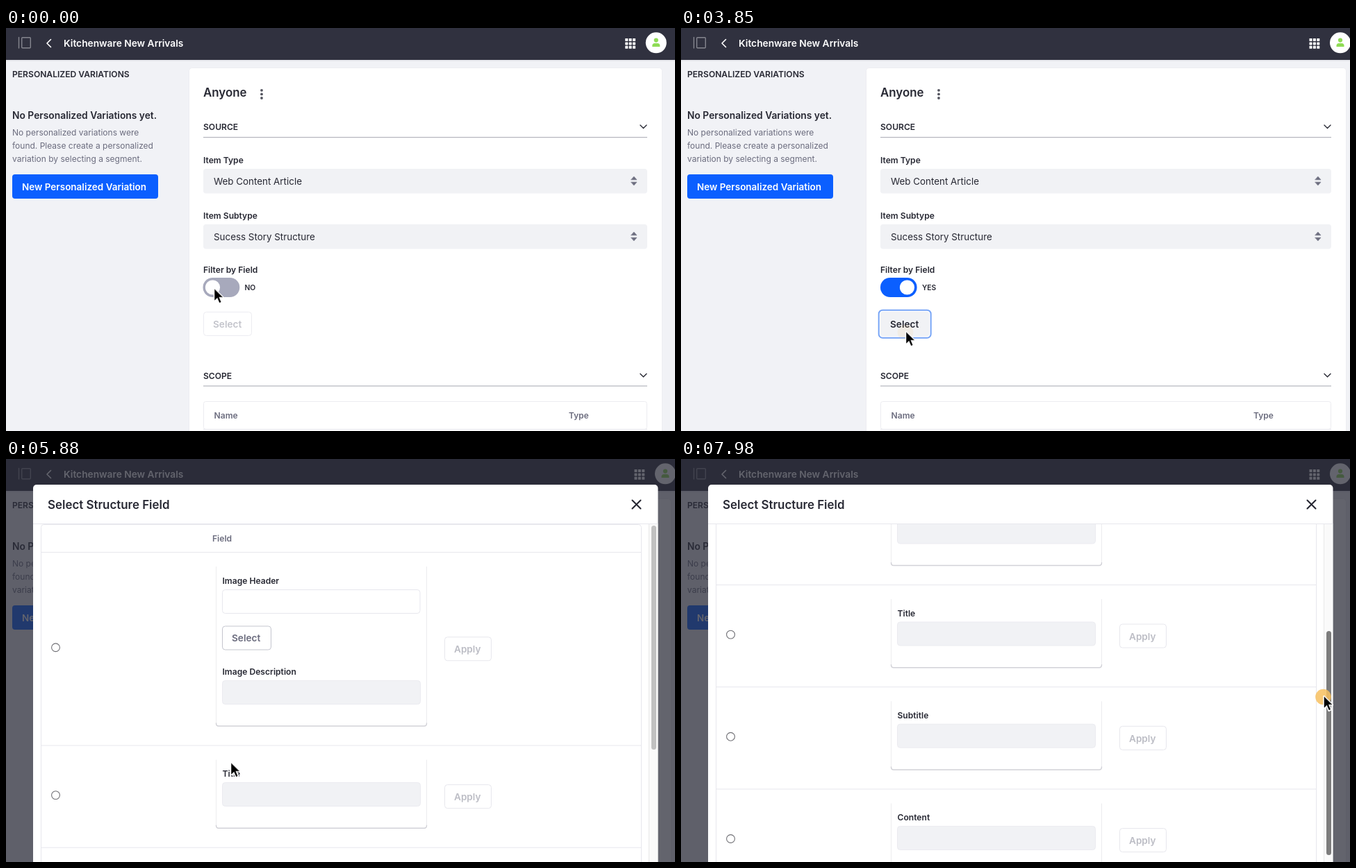
Write an HTML page that moves like this. It is 963 px wide and 581 px high and loops after 8000 ms.

```html
<!DOCTYPE html>
<html lang="en">
<head>
<meta charset="utf-8">
<title>Personalized variations</title>
<style>
  html, body { margin: 0; width: 100%; height: 100%; overflow: hidden; background: #f1f2f6; }
  svg { display: block; width: 100vw; height: 100vh; font-family: Inter, "Open Sans", sans-serif; }
</style>
</head>
<body>
<svg id="stage" viewBox="0 0 963 581" preserveAspectRatio="none"></svg>
<script>
const INK = '#272833', GREY = '#6b6c7e', BLUE = '#0b5fff', FIELD = '#f1f2f5', LINE = '#e7e7ed', RING = '#78a5f6';

// ---- drawing helpers; text is placed by the middle of its capitals ----
const text = (x, mid, s, size = 12.1, fill = INK, weight = 600) =>
  `<text x="${x}" y="${mid + size * .364}" font-size="${size}" font-weight="${weight}" fill="${fill}">${s}</text>`;
const rect = (x, y, w, h, fill, r = 0, stroke = 'none', sw = 1) =>
  `<rect x="${x}" y="${y}" width="${w}" height="${h}" rx="${r}" fill="${fill}" stroke="${stroke}" stroke-width="${sw}"/>`;
const circle = (x, y, r, fill, stroke = 'none', sw = 1) =>
  `<circle cx="${x}" cy="${y}" r="${r}" fill="${fill}" stroke="${stroke}" stroke-width="${sw}"/>`;
const path = (d, stroke, sw = 1.5, fill = 'none') =>
  `<path d="${d}" fill="${fill}" stroke="${stroke}" stroke-width="${sw}" stroke-linecap="round" stroke-linejoin="round"/>`;
const group = (id, body, attrs = '') => `<g id="${id}" ${attrs}>${body}</g>`;
const button = (x, y, w, label, fill, border) =>
  rect(x + .5, y + .5, w - 1, 34, '#fff', 4, border) + text(x + 14, y + 18, label, 13.6, fill);

function sidebar() {
  const lines = ['No personalized variations were', 'found. Please create a personalized', 'variation by selecting a segment.'];
  return text(9, 66.5, 'PERSONALIZED VARIATIONS') +
    text(9, 125.5, 'No Personalized Variations yet.', 13.8) +
    lines.map((s, i) => text(9, 151 + i * 18.6, s, 12, GREY, 400)).join('') +
    rect(9, 211, 210, 35, BLUE, 4) +
    text(23, 229, 'New Personalized Variation', 13.5, '#fff');
}

function topBar() {
  return rect(0, 46, 963, 2, '#e6e7ec') + rect(0, 0, 963, 46, '#30313f') +
    path('M18.5 13.5V29', '#85868f', 1.4) + rect(22.7, 13.7, 12.6, 15, 'none', 1, '#85868f', 1.4) +
    path('M64.5 16.5L59 22L64.5 27.5', '#fff', 1.6) +
    text(83, 21.5, 'Kitchenware New Arrivals', 13.75, '#fff');
}

function userArea(x) {
  let s = '';
  for (let i = 0; i < 9; i++)
    s += rect(x - 44.5 + i % 3 * 5.4, 15 + Math.floor(i / 3) * 5.4, 4, 4, '#fff', .6);
  return s + circle(x, 21.3, 15, '#fff') + circle(x, 17.6, 3.1, '#8fdc55') +
    path(`M${x - 5.5} 27V25.5Q${x - 5.5} 22 ${x - 2} 22H${x + 2}Q${x + 5.5} 22 ${x + 5.5} 25.5V27Z`, 'none', 0, '#8fdc55');
}

function section(l, r, y, label) {
  return text(l, y, label) + rect(l, y + 14, r - l, 1.2, '#b4b5bd') +
    path(`M${r - 10} ${y - 3}L${r - 5.5} ${y + 1.5}L${r - 1} ${y - 3}`, INK, 1.4);
}

function dropdown(l, r, y, label, value) {
  const x = r - 19;
  return text(l, y, label) + rect(l, y + 12.5, r - l, 35.5, FIELD, 4) +
    text(l + 15, y + 30.5, value, 13.4, INK, 400) +
    path(`M${x - 4} ${y + 28.3}H${x + 4}L${x} ${y + 23.8}ZM${x - 4} ${y + 31.7}H${x + 4}L${x} ${y + 36.2}Z`, GREY, .6, GREY);
}

// The page body; it grows when the page scrollbar goes away.
function panel(l, r, typeX, controls) {
  const dot = y => circle(l + 84, y, 1.9, '#54555f');
  return rect(l - 20.5, 57.5, r - l + 42, 560, '#fff', 4, '#ededf2') +
    text(l, 93, 'Anyone', 16.9) + dot(89.8) + dot(95.4) + dot(101) +
    section(l, r, 143, 'SOURCE') +
    dropdown(l, r, 190.5, 'Item Type', 'Web Content Article') +
    dropdown(l, r, 270.5, 'Item Subtype', 'Sucess Story Structure') +
    text(l, 349, 'Filter by Field') + controls +
    section(l, r, 501.5, 'SCOPE') +
    rect(l + .5, 538.5, r - l - 1, 40, 'none', 3, '#ececf0') + rect(l, 578, r - l, 1, LINE) +
    text(l + 15.5, 559, 'Name', 12.1, GREY) + text(typeX, 559, 'Type', 12, GREY);
}

function narrowControls() {
  return rect(281.5, 357.7, 57, 32.4, '#fff', 16.2, RING, 2).replace('<rect', '<rect id="ring"') +
    rect(283.5, 360, 52.8, 28, '#a7a9bc', 14).replace('<rect', '<rect id="track"') +
    circle(297.5, 374, 10.6, '#fff').replace('<circle', '<circle id="knob"') +
    group('no', text(343.5, 374, 'NO', 10.3) + button(284, 409, 70, 'Select', '#c3c4cb', '#ececf1')) +
    group('yes', text(343.5, 374, 'YES', 10.3) + button(284, 409, 70, 'Select', '#393a4a', '#cdced9'));
}

function wideControls() {
  return rect(287, 360, 52.6, 28, BLUE, 14) + circle(325.5, 374, 10.6, '#fff') +
    text(347, 374, 'YES', 10.3) +
    rect(284.7, 406.7, 75, 40, '#fff', 5.5, RING, 2) + rect(287, 409, 70.5, 35.5, FIELD, 4) +
    text(301, 427, 'Select', 13.6);
}

// ---- dialog ----
const grayBox = y => rect(311.5, y + .5, 285, 34, FIELD, 4, '#ebebf0');
function row(top, height, label, extra = '') {
  const bottom = top + height - 28, mid = top + height / 2 - 2;
  return rect(51, top + height - .5, 864, 1, LINE) +
    path(`M302.5 ${top + 21}V${bottom - 4}M605.5 ${top + 21}V${bottom - 4}`, '#ececef', 1) +
    path(`M302.5 ${bottom - 4}Q302.5 ${bottom} 306 ${bottom}H602Q605.5 ${bottom} 605.5 ${bottom - 4}`, '#d2d2d8', 1.5) +
    text(311.5, top + 41, label) + extra +
    circle(71.5, mid, 5.9, '#fff', '#6f6f74', 1.1) +
    button(631, mid - 15.5, 68, 'Apply', '#bcbdc5', LINE);
}

function dialog() {
  const first = rect(311.5, 188.5, 284.5, 34, '#fff', 4, LINE) +
    button(311, 240.5, 71, 'Select', GREY, '#c4c5ce') +
    text(311.5, 307, 'Image Description') + grayBox(319);
  const rows = rect(50.5, 94.5, 864, 760, '#fff', 4, LINE) + text(297, 115, 'Field', 12.1, GREY) +
    rect(51, 134, 864, 1, LINE) + row(134.5, 278.5, 'Image Header', first) +
    ['Title', 'Subtitle', 'Content'].map((s, i) => {
      const y = 413 + i * 147.2;
      return row(y, 147.2, s, grayBox(y + 53));
    }).join('');
  return rect(39, 37, 899.5, 556, '#fff', 5) +
    text(60, 65.5, 'Select Structure Field', 16.9) +
    path('M901.5 59.5L913.5 71.5M913.5 59.5L901.5 71.5', INK, 2.1) +
    rect(39, 93, 899.5, 1, LINE) +
    group('spin', '') +
    group('content', group('rows', rows) + rect(925.5, 94, 13, 499, '#fafafa') + rect(925, 94, 1, 499, '#e8e8e8') +
      rect(929, 96, 7, 323, '#c1c1c1', 3.5).replace('<rect', '<rect id="thumb"'), 'clip-path="url(#view)"');
}

const arrow = path('M0 0V17.2L4 13.5L7 20.8L10 19.5L7 12.4H12.4Z', '#fff', 2.4, '#fff') +
  path('M.5 1.2V16.2L4.3 12.6L7.4 19.8L9.2 19L6.2 11.8H11.2Z', '#000', .5, '#000');
const hand = `<g transform="rotate(-8)">` +
  path('M-2 1C-2-1 2-1 2 1V8C2 6.3 5.4 6.3 5.4 8.5C5.4 7 8.8 7.3 8.8 9.4C8.8 8.2 12 8.6 12 11V14.5C12 17 10.3 18 10.3 21H1C1 18-4 15-6 11.5C-7.4 9-4.4 7.8-3.4 9.8L-2 11.8Z', '#111', 1.5, '#fff') +
  path('M2.8 13V17.5M5.6 13V17.5M8.4 13V17.5', '#111', 1.1) + '</g>';

const stage = document.getElementById('stage');
stage.innerHTML =
  '<clipPath id="view"><rect x="39" y="94" width="899.5" height="499"/></clipPath>' +
  rect(0, 0, 963, 581, '#f1f2f6') + sidebar() +
  group('narrow', panel(284, 923, 810, narrowControls())) +
  group('wide', panel(287, 936, 824, wideControls())) +
  topBar() + group('userNarrow', userArea(935.8)) + group('userWide', userArea(949)) +
  group('shade', rect(0, 0, 963, 581, '#2a2b38')) +
  group('dialog', dialog()) +
  group('click', circle(0, 0, 11.3, '#f7bf5f')) +
  group('arrow', arrow) + group('hand', hand);

const el = {};
stage.querySelectorAll('[id]').forEach(n => el[n.id] = n);
const set = (id, name, value) => el[id].setAttribute(name, value);
const show = (id, on) => { el[id].style.display = on ? '' : 'none'; };

// ---- motion ----
const LOOP = 8000, STEP = 70;
const TOGGLE = 1190, PRESS = 3640, WIDEN = 3780, OPEN = 3890, LOADED = 4620, DRAG = 7280;
const clamp = v => Math.max(0, Math.min(1, v));
const span = (t, a, b) => clamp((t - a) / (b - a));
const ease = p => p * p * (3 - 2 * p);
const mix = (a, b, p) => a + (b - a) * p;

// time, x, y
const route = [
  [0, 300, 376], [1540, 300, 376], [2030, 311, 428], [2240, 311, 428], [2730, 324, 438],
  [5880, 324, 438], [6650, 935, 186], [7210, 935, 186], [DRAG, 934, 190], [7980, 925.5, 342]
];
function pointer(t) {
  let i = 0;
  while (i < route.length - 2 && t >= route[i + 1][0]) i++;
  const [a, x, y] = route[i], [b, u, v] = route[i + 1], p = ease(span(t, a, b));
  return [mix(x, u, p), mix(y, v, p)];
}

const sizes = [5.6, 4.7, 4, 3.5, 2.6, 2.9, 5.6], alphas = [1, .75, .55, .42, .25, .35, 1];
function spinner(t) {
  const head = (Math.min(t, 4410) - 4060) / 200;
  let s = '';
  for (let k = 0; k < 6; k++) {
    const lag = ((head - k) % 6 + 6) % 6, i = Math.floor(lag), f = lag - i, a = k * Math.PI / 3;
    s += `<g opacity="${mix(alphas[i], alphas[i + 1], f)}">` +
      circle(488.5 + 13 * Math.sin(a), 344 - 12.3 * Math.cos(a), mix(sizes[i], sizes[i + 1], f), GREY) + '</g>';
  }
  return s;
}

function render(t) {
  const wide = t >= WIDEN, on = span(t, TOGGLE, TOGGLE + 140);
  show('narrow', !wide); show('userNarrow', !wide);
  show('wide', wide); show('userWide', wide);

  set('knob', 'cx', mix(297.5, 322, on));
  set('track', 'fill', `rgb(${mix(167, 11, on)},${mix(169, 95, on)},${mix(188, 255, on)})`);
  set('ring', 'opacity', t < PRESS ? on : 0);
  show('no', on < .5); show('yes', on >= .5);

  const fade = span(t, OPEN, OPEN + 150), drop = span(t, OPEN, OPEN + 300);
  set('shade', 'opacity', fade * .73);
  set('dialog', 'opacity', fade);
  set('dialog', 'transform', `translate(0 ${-50 * Math.pow(1 - drop, 1.5)})`);
  show('dialog', fade > 0);
  const loaded = t >= LOADED;
  show('content', loaded); show('spin', !loaded);
  if (fade > 0 && !loaded) el.spin.innerHTML = spinner(t);

  const [x, y] = pointer(t);
  const pull = t > DRAG ? y - 190 : 0;
  set('thumb', 'y', 96 + pull);
  set('thumb', 'fill', t >= 6650 ? '#7d7d7d' : '#c1c1c1');
  set('rows', 'transform', `translate(0 ${-pull * 231.5 / 152})`);

  const isHand = t >= 1960 && t < 3710;
  show('hand', isHand); show('arrow', !isHand);
  set(isHand ? 'hand' : 'arrow', 'transform', `translate(${x} ${y})`);

  const pulse = a => t < a ? 0 : 1 - span(t, a + 70, a + 230);
  set('click', 'opacity', .85 * Math.max(pulse(TOGGLE - 70), pulse(PRESS), t >= DRAG ? 1 : 0));
  set('click', 'transform', `translate(${x - 1} ${y + 1})`);
}

const start = performance.now();
function tick() {
  const t = (performance.now() - start) % LOOP;
  render(Math.floor(t / STEP) * STEP);
  requestAnimationFrame(tick);
}
tick();
</script>
</body>
</html>
```
